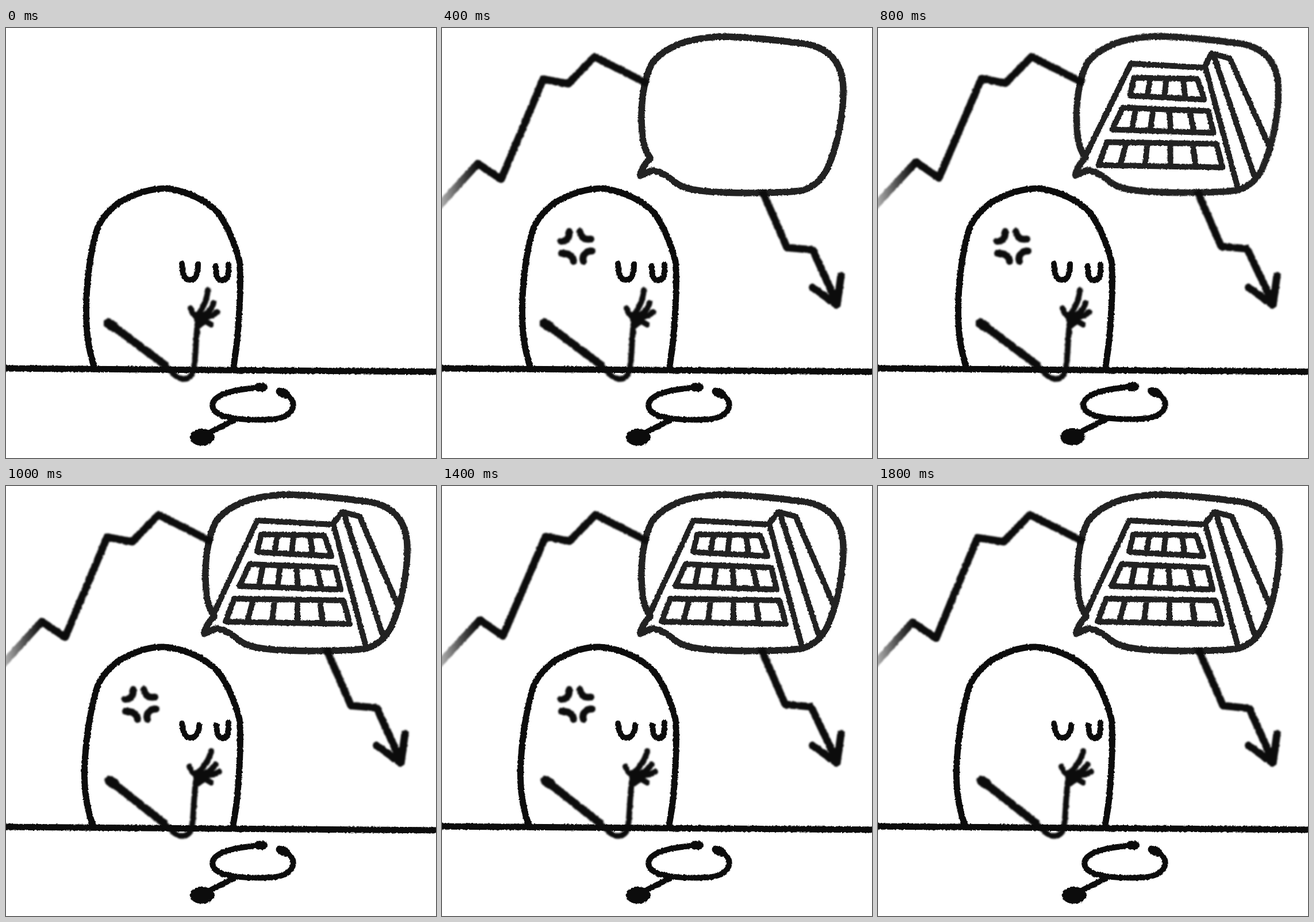
These frames come from a looping animation (748 px wide and 748 px high, 2 s). An HTML page without scripts:

```html
<!DOCTYPE html>
<html lang="en">
<head>
<meta charset="utf-8">
<title>Worried doctor</title>
<style>
  html, body { margin: 0; width: 100%; height: 100%; overflow: hidden; background: #fff; }
  svg { display: block; width: 100vw; height: 100vh; }
  path { fill: none; stroke: #0c0c0c; stroke-width: 11; stroke-linejoin: round; stroke-linecap: round; }
  ellipse { fill: #0c0c0c; }
  .rough { filter: url(#rough); }
  .soft { filter: url(#soft); }
  .talk path { stroke: #222; stroke-width: 11.5; }
  .building path { stroke: #222; stroke-width: 10; }
  .eyes path, .hand path { stroke-width: 10; }
  .hand .arm { stroke-width: 14; }
  .hand .shoulder { stroke-width: 18; }
  .hand .palm { fill: #0c0c0c; }
  .chart path { stroke-width: 13; stroke-linecap: butt; }
  .chart .rise { stroke: url(#fade); }
  .chart .tip { stroke-linecap: round; }
  .mark path { stroke-width: 12; }

  /* Every part holds its pose for whole 200 ms beats. */
  .show { animation: 2s step-end infinite; }
  .even, .odd { animation: even .4s step-end infinite; }
  .odd { animation-name: odd; }
  @keyframes even { 0% { opacity: 1 } 50% { opacity: 0 } }
  @keyframes odd { 0% { opacity: 0 } 50% { opacity: 1 } }

  .beat1 { animation-name: beat1; }
  .from1 { animation-name: from1; }
  .from2 { animation-name: from2; }
  .from3 { animation-name: from3; }
  @keyframes beat1 { 0%, 20% { opacity: 0 } 10% { opacity: 1 } }
  @keyframes from1 { 0% { opacity: 0 } 10% { opacity: 1 } }
  @keyframes from2 { 0% { opacity: 0 } 20% { opacity: 1 } }
  @keyframes from3 { 0% { opacity: 0 } 30% { opacity: 1 } }

  .chart1 { animation-name: chart1; }
  .chart2 { animation-name: chart2; }
  .chart3 { animation-name: chart3; }
  .anger { animation-name: anger; }
  @keyframes chart1 { 0%, 20%, 50%, 80% { opacity: 0 } 10%, 40%, 70% { opacity: 1 } }
  @keyframes chart2 { 0%, 30%, 60%, 90% { opacity: 0 } 20%, 50%, 80% { opacity: 1 } }
  @keyframes chart3 { 0%, 40%, 70% { opacity: 0 } 30%, 60%, 90% { opacity: 1 } }
  @keyframes anger { 0%, 30%, 60%, 90% { opacity: 0 } 10%, 40%, 70% { opacity: 1 } }

  .scope { animation-name: scope; }
  .bubble { animation-name: bubble; }
  .table { animation-name: table; }
  @keyframes scope {
    0%, 20%, 50%, 70%, 90% { transform: none }
    10%, 40%, 60%, 80% { transform: matrix(1.015, 0, 0, 1, -7.5, -1) }
  }
  @keyframes bubble {
    0%, 50%, 90% { transform: none }
    40%, 80% { transform: translate(-1.5px, -.5px) }
  }
  @keyframes table {
    0%, 20%, 40%, 60%, 90% { transform: none }
    10%, 30%, 50%, 80% { transform: translateY(1px) }
  }
</style>
</head>
<body>
<svg viewBox="0 0 748 748">
  <defs>
    <filter id="rough" filterUnits="userSpaceOnUse" x="-20" y="-20" width="788" height="788" color-interpolation-filters="sRGB">
      <feTurbulence type="fractalNoise" baseFrequency=".28" numOctaves="2" seed="4"/>
      <feDisplacementMap in="SourceGraphic" scale="3.5" xChannelSelector="R" yChannelSelector="G"/>
      <feGaussianBlur stdDeviation=".7"/>
    </filter>
    <filter id="soft" filterUnits="userSpaceOnUse" x="-20" y="-20" width="788" height="788" color-interpolation-filters="sRGB">
      <feTurbulence type="fractalNoise" baseFrequency=".2" numOctaves="2" seed="9"/>
      <feDisplacementMap in="SourceGraphic" scale="3" xChannelSelector="R" yChannelSelector="G"/>
      <feGaussianBlur stdDeviation="1.4"/>
    </filter>
    <linearGradient id="fade" gradientUnits="userSpaceOnUse" x1="0" y1="0" x2="62" y2="0">
      <stop stop-color="#aaa"/>
      <stop offset=".5" stop-color="#555"/>
      <stop offset="1" stop-color="#0c0c0c"/>
    </linearGradient>
    <g id="windows" class="building">
      <path d="M444 84L554 86L566 122L437 115ZM472 85L467 116M500 85L497 118M529 86L533 119"/>
      <path d="M424 136L573 142L582 180L406 174ZM447 138L440 175M477 140L472 176M505 140L508 178M540 142L549 178"/>
      <path d="M397 196L587 199L598 240L382 236ZM430 198L420 235M467 198L463 237M507 199L507 238M546 199L551 238"/>
    </g>
  </defs>

  <g class="rough">
    <g class="show from2 talk">
      <g class="show bubble">
        <path style="fill:#fff" d="M362 226C350 208 347 190 347 150C348 110 356 80 365 62C385 35 425 17 485 15C530 15 590 22 635 28C675 36 697 62 698 105C699 150 688 205 670 245C660 265 645 278 625 283C580 288 500 288 460 284C435 282 418 278 405 268C390 256 378 248 365 248L345 257C346 247 354 235 362 226Z"/>
      </g>
    </g>
    <g class="show from3 building">
      <g class="odd">
        <path d="M360 225L437 60L568 67L585 45L615 53L683 211M570 69L625 275M588 48L655 259"/>
        <use href="#windows"/>
      </g>
      <g class="even">
        <path d="M360 224L440 62L568 69L580 44L612 53L683 211M570 70L625 275M584 48L655 259"/>
        <use href="#windows" transform="translate(1.5 2.5)"/>
      </g>
    </g>
  </g>

  <g class="soft chart">
    <g class="show chart1">
      <path class="rise" d="M-8 313L66 233L106 261L180 88L222 96L267 50L358 96"/>
      <path d="M555 283L597 380L642 384L684 472"/>
    </g>
    <g class="show chart2">
      <path class="rise" d="M-8 313L62 236L103 263L176 89L220 97L265 50L358 97"/>
      <path d="M557 283L600 382L645 386L684 472"/>
    </g>
    <g class="show chart3">
      <path class="rise" d="M-8 313L60 237L101 265L173 90L219 97L264 50L358 97"/>
      <path d="M557 283L600 382L646 387L684 472"/>
    </g>
    <g class="show beat1">
      <path d="M357 96L412 124L450 188L512 184L557 287"/>
    </g>
    <g class="show from1">
      <path class="tip" d="M644 451L687 482L694 431"/>
    </g>
  </g>

  <g class="rough">
    <g class="even">
      <path d="M154 592C142 555 138 520 140 470C142 425 148 388 156 358C162 336 176 318 198 303C222 289 250 279 280 279C318 284 350 302 368 320C384 342 397 372 406 405C409 440 407 480 404 520C402 550 398 575 395 595"/>
      <g class="eyes">
        <path d="M306 410C307 430 310 438 320 438C331 438 334 425 334 411M365 414C365 430 367 439 376 439C387 439 388 425 387 411"/>
      </g>
    </g>
    <g class="odd">
      <path d="M152 592C138 555 135 520 137 480C140 425 148 388 156 358C162 336 176 318 198 303C222 289 250 279 275 280C310 283 345 298 368 322C384 342 397 372 406 405C409 440 407 480 404 520C402 550 398 575 394 595"/>
      <g class="eyes">
        <path d="M306 413C308 430 312 438 321 438C333 437 336 425 336 416M366 416C367 432 370 439 377 439C387 439 387 425 387 411"/>
      </g>
    </g>
    <g class="show table">
      <path d="M-10 592L758 598"/>
    </g>
    <g class="show scope">
      <path style="stroke-width:10" d="M443 625C420 627 395 630 378 637C352 648 355 665 375 674C400 682 440 683 470 680C498 675 509 655 491 640M397 682L350 706"/>
      <ellipse cx="443" cy="625" rx="12" ry="8"/>
      <ellipse cx="482" cy="635" rx="13" ry="8" transform="rotate(22 482 635)"/>
      <ellipse cx="341" cy="712" rx="21" ry="15"/>
    </g>
  </g>

  <g class="soft">
    <g class="show anger mark">
      <path d="M207 371C218 371 222 364 221 354M240 354C241 365 250 369 259 367M208 392C219 391 228 397 229 406M261 388C250 387 243 396 246 406"/>
    </g>
    <g class="even hand">
      <path class="shoulder" d="M179 514L187 520"/>
      <path class="arm" d="M184 517L276 586"/>
      <path d="M274 585L285 595C300 613 315 615 323 603C330 590 329 560 333 515"/>
      <path d="M351 456C350 474 343 486 336 496M361 478Q358 491 345 499M367 494Q360 502 342 504M357 516L340 506M321 488Q323 497 333 503"/>
      <path class="palm" d="M331 499L348 501L344 511L334 519Z"/>
    </g>
    <g class="odd hand">
      <path class="shoulder" d="M181 513L188 518"/>
      <path class="arm" d="M185 516L274 586"/>
      <path d="M272 585L283 594C297 611 311 613 320 602C327 590 325 560 330 515"/>
      <path d="M357 461C353 478 344 488 336 496M365 484Q359 494 345 500M371 497Q362 503 342 504M357 516L340 506M319 488Q321 497 331 503"/>
      <path class="palm" d="M330 499L347 501L343 511L332 519Z"/>
    </g>
  </g>
</svg>
</body>
</html>
```
